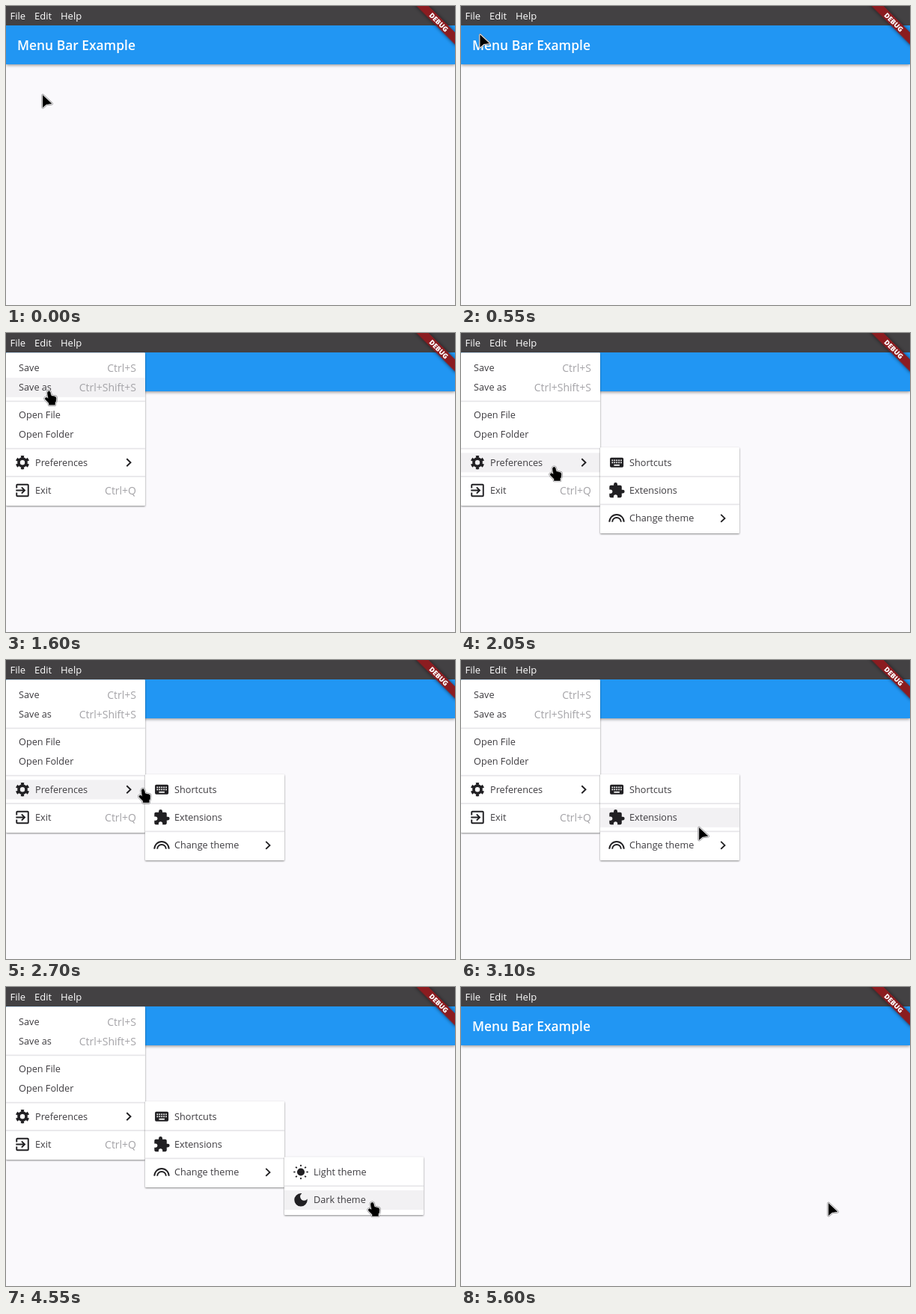
Recreate the animation shown at these times as an HTML page. Size 600 by 400 pixels, loop 6 s.

```html
<!DOCTYPE html>
<html lang="en">
<head>
<meta charset="utf-8">
<title>Menu bar</title>
<style>
  html, body { margin: 0; width: 100%; height: 100%; overflow: hidden; background: #faf9fc; }
  svg { display: block; }
  text { font: 12.7px "Open Sans", "Noto Sans", sans-serif; fill: #3e3c40; }
  .bar text { font-size: 13px; font-weight: 500; fill: #fff; }
  .title { font-size: 17.4px; font-weight: 600; fill: #fff; }
  .keys { font-size: 14px; fill: #a5a4a8; text-anchor: end; }
  .banner { font-size: 9.2px; font-weight: 800; fill: #fff; text-anchor: middle; }
  .panel { fill: #fff; filter: drop-shadow(0 1px 1.3px #0007); }
  .row { fill: none; }
  .row.on { fill: #f2f1f3; }
  .line { fill: none; stroke: #212023; }
  .icon { fill: #212023; }
</style>
</head>
<body>
<svg id="stage" width="600" height="400" viewBox="0 0 600 400">
  <rect width="600" height="400" fill="#faf9fc"/>
  <rect y="26" width="600" height="52" fill="#2196f3" style="filter: drop-shadow(0 1.5px 2px #0007)"/>
  <text class="title" x="15" y="59">Menu Bar Example</text>
  <g id="menus"></g>
  <g class="bar">
    <rect width="600" height="26" fill="#434143"/>
    <svg width="33" height="26"><circle id="barRipple" cx="28" cy="23" fill="#fff"/></svg>
    <text x="5.5" y="17.5">File</text>
    <text x="38" y="17.5">Edit</text>
    <text x="73" y="17.5">Help</text>
  </g>
  <svg x="372" y="271.8" width="186" height="26"><circle id="rowRipple" cx="118" cy="16" fill="#000" opacity=".08"/></svg>
  <g transform="translate(600) rotate(45)">
    <rect x="-40" y="25" width="80" height="11.4" fill="#8b1c20" style="filter: drop-shadow(0 0 2.5px #0009)"/>
    <text class="banner" y="34.1">DEBUG</text>
  </g>
  <g id="arrow" stroke-linejoin="round"></g>
  <g id="hand" stroke-linejoin="round"></g>
</svg>
<script>
const $ = id => document.getElementById(id);
const LOOP = 6000, STEP = 50, ROW = 26, GAP = 11.3, PAD = 7.5, WIDTH = 186, CLOSE = 5250;

// Icons live in a 24-unit box.
const icons = {
  gear: `<circle class="line" cx="12" cy="12" r="5.2" stroke-width="3.8"/>
    <circle class="line" cx="12" cy="12" r="7.9" stroke-width="3.2" pathLength="12" stroke-dasharray="1 1" stroke-dashoffset="-.5"/>`,
  exit: `<path class="line" stroke-width="2" d="M4 9V5q0-1 1-1H19q1 0 1 1V19q0 1-1 1H5q-1 0-1-1V15M3 12H15M10.8 7.7L15.1 12l-4.3 4.3"/>`,
  keyboard: `<rect class="icon" x="2.8" y="5.3" width="18.6" height="13.4" rx="1.8"/>
    <path stroke="#fff" stroke-width="1.8" stroke-dasharray="1.8 1.2" d="M5.3 9H19M5.3 12H19"/>
    <path stroke="#fff" stroke-width="1.8" d="M8.3 15.6H16"/>`,
  puzzle: `<path class="icon" d="M20.5 11H19V7c0-1.1-.9-2-2-2h-4V3.5a2.5 2.5 0 0 0-5 0V5H4c-1.1 0-2 .9-2 2v3.8h1.5a2.7 2.7 0 0 1 0 5.4H2V20c0 1.1.9 2 2 2h3.8v-1.5a2.7 2.7 0 0 1 5.4 0V22H17c1.1 0 2-.9 2-2v-4h1.5a2.5 2.5 0 0 0 0-5z"/>`,
  rainbow: `<path class="line" stroke-width="2" d="M2 17a10 10 0 0 1 20 0M6 17a6 6 0 0 1 12 0"/>`,
  sun: `<circle class="icon" cx="12" cy="12" r="5.2"/>
    <circle class="line" cx="12" cy="12" r="8.8" stroke-width="2.3" pathLength="16" stroke-dasharray=".55 1.45" stroke-dashoffset=".275"/>`,
  moon: `<path class="icon" d="M12 3a9 9 0 1 0 9 9c0-.46-.04-.92-.1-1.36a5.4 5.4 0 0 1-4.4 2.26 5.4 5.4 0 0 1-3.14-9.8c-.44-.06-.9-.1-1.36-.1z"/>`
};

// Items: [label, icon, shortcut or "›" for a submenu]; null is a divider.
const menus = [
  { x: 0, y: 26.3, h: 204.7, open: 800, items: [
    ["Save", "", "Ctrl+S"], ["Save as", "", "Ctrl+Shift+S"], null,
    ["Open File"], ["Open Folder"], null,
    ["Preferences", "gear", "›"], null, ["Exit", "exit", "Ctrl+Q"]] },
  { x: 186, y: 153, h: 115, open: 1900, items: [
    ["Shortcuts", "keyboard"], null, ["Extensions", "puzzle"], null, ["Change theme", "rainbow", "›"]] },
  { x: 372, y: 227.2, h: 77.8, open: 3200, items: [
    ["Light theme", "sun"], null, ["Dark theme", "moon"]] }
];

const rows = [];

function itemMarkup([label, icon, extra], x, y) {
  const mid = y + ROW / 2;
  let out = `<rect class="row" x="${x}" y="${y}" width="${WIDTH}" height="${ROW}"/>
    <text x="${x + (icon ? 39 : 17)}" y="${mid + 4.2}">${label}</text>`;
  if (icon) out += `<g transform="translate(${x + 22} ${mid - .2}) scale(.97) translate(-12 -12)">${icons[icon]}</g>`;
  if (extra === "›") out += `<path class="line" stroke-width="1.9" d="M${x + 161.3} ${mid - 5.2}l5.2 5-5.2 5"/>`;
  else if (extra) out += `<text class="keys" x="${x + 174}" y="${mid + 5}">${extra}</text>`;
  return out;
}

for (const menu of menus) {
  const { x, y, h, items } = menu;
  let top = y + PAD;
  let out = `<rect class="panel" x="${x}" y="${y}" width="${WIDTH}" height="${h}" rx="1"/>`;
  for (const item of items) {
    if (item) {
      out += itemMarkup(item, x, top);
      rows.push({ menu, x, y: top });
      top += ROW;
    } else {
      out += `<rect x="${x}" y="${top + 4.7}" width="${WIDTH}" height="1.7" fill="#e7e6e9"/>`;
      top += GAP;
    }
  }
  menu.node = document.createElementNS("http://www.w3.org/2000/svg", "g");
  menu.node.innerHTML = out;
  $("menus").append(menu.node);
}
document.querySelectorAll(".row").forEach((node, i) => rows[i].node = node);

const outlined = d => [["#8a898c", 3.6], ["#fff", 2.3], ["#000", .6]]
  .map(([c, w]) => `<path d="${d}" fill="#000" stroke="${c}" stroke-width="${w}"/>`).join("");
$("arrow").innerHTML = outlined("M1.2 1.5V17.6L6 13.4L13 12.6Z");
$("hand").innerHTML = outlined("M-2 1Q-.3-.7 1 1.3L2.4 6.3L7.5 7.5Q9.2 8 9 10L8.7 14L7.5 15.5V18.5H-.5V16.3L-5.3 11.5Q-6.6 9.5-5 8.8T-1.5 10.3L-2.6 2.5Z");

// Pointer tip: [time, x, y]
const path = [
  [0, 48, 118], [200, 44, 104], [400, 32, 62], [600, 22, 29], [650, 23, 26], [700, 28, 23],
  [1350, 28, 23], [1500, 38, 48], [1750, 88, 122], [1900, 115, 161], [2000, 123, 177], [2050, 125, 179],
  [2500, 125, 179], [2650, 158, 173], [2800, 235, 171], [2950, 302, 189], [3050, 316, 214],
  [3100, 317, 223], [3150, 319, 229], [3200, 320, 237], [3300, 322, 246],
  [3900, 322, 246], [4050, 358, 245], [4250, 440, 247], [4400, 479, 263], [4500, 489, 283], [4550, 490, 288],
  [LOOP, 490, 288]
];

function tipAt(t) {
  const i = Math.max(1, path.findIndex(p => p[0] >= t));
  const [t0, x0, y0] = path[i - 1], [t1, x1, y1] = path[i];
  const k = (t - t0) / (t1 - t0);
  return [x0 + (x1 - x0) * k, y0 + (y1 - y0) * k];
}

const isOpen = (menu, t) => t >= menu.open && t < CLOSE;

function rowAt(t) {
  const [x, y] = tipAt(t);
  return rows.find(r => isOpen(r.menu, t) && x >= r.x && x < r.x + WIDTH && y >= r.y && y < r.y + ROW - .9);
}

const show = (node, on) => node.setAttribute("visibility", on ? "visible" : "hidden");

function draw(now) {
  const t = Math.floor(now % LOOP / STEP) * STEP;
  for (const menu of menus) menu.node.style.display = isOpen(menu, t) ? "" : "none";

  // The highlight trails the pointer by one step.
  const lit = rowAt(Math.max(0, t - STEP));
  for (const row of rows) row.node.classList.toggle("on", row === lit);

  $("barRipple").setAttribute("r", Math.max(0, (t - 650) * .067));
  $("barRipple").setAttribute("opacity", t < 700 ? 0 : .2 * Math.max(0, Math.min(1, (1250 - t) / 300)));
  $("rowRipple").setAttribute("r", Math.max(0, (t - 5050) * .3));
  show($("rowRipple"), t >= 5100 && t < CLOSE);

  const [x, y] = tipAt(t);
  const pointing = y < 26 || !!rowAt(t);
  for (const id of ["arrow", "hand"]) {
    $(id).setAttribute("transform", `translate(${x} ${y})`);
    show($(id), (id === "hand") === pointing);
  }
}

const start = performance.now();
function loop() {
  draw(performance.now() - start);
  requestAnimationFrame(loop);
}
loop();
</script>
</body>
</html>
```
